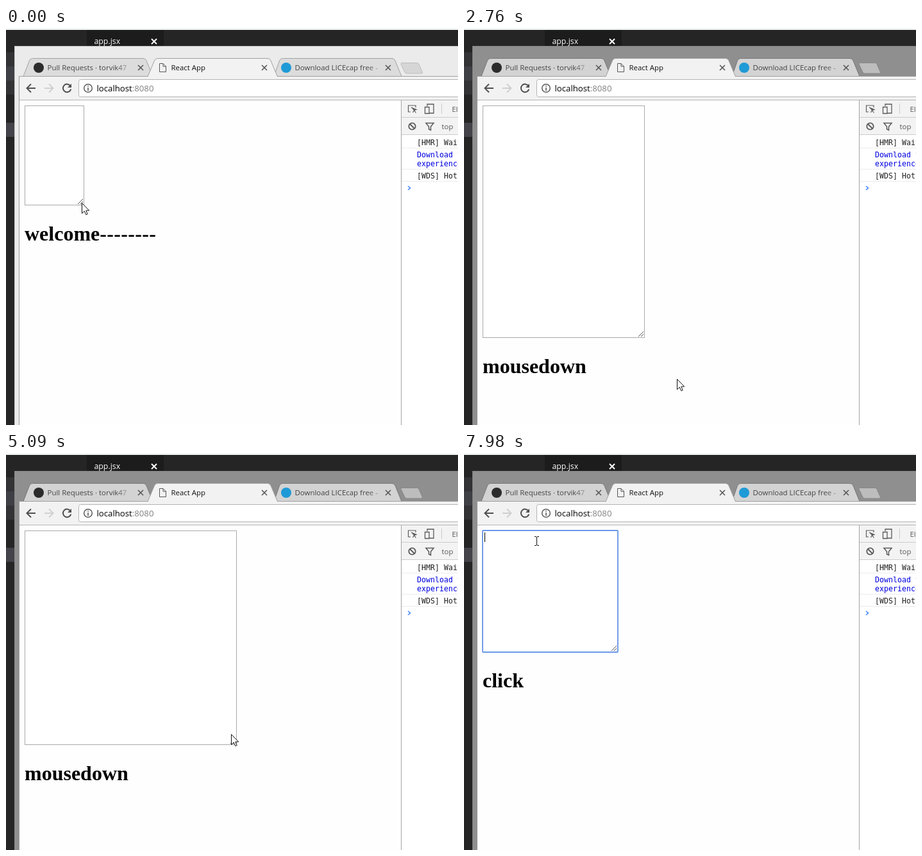
An HTML page for the animation above (8000 ms loop, 705 px wide and 620 px high).

```html
<!DOCTYPE html>
<html lang="en">
<head>
<meta charset="utf-8">
<title>React App</title>
<style>
  html, body { margin: 0; width: 100%; height: 100%; overflow: hidden; background: #252526; }
  svg { display: block; width: 705px; height: 620px; }
  text { white-space: pre; }
  .ui { font: 11.45px "Open Sans", "Noto Sans", sans-serif; }
  .mono { font: 11.63px "DejaVu Sans Mono", monospace; fill: #222; }
  .head { font: bold 32px "Liberation Serif", serif; }
  .line { fill: none; stroke-width: 1; }
  .icon { fill: none; stroke: #5a5a5a; stroke-width: 1.5; }
  .frame { fill: #ebebeb; }
  .tab { fill: #dcdcdc; stroke: #a2a2a2; }
  .plus { fill: #d6d6d6; stroke: #bcbcbc; }
  .active .frame { fill: #8f8f8f; }
  .active .tab { fill: #d3d3d3; stroke: #777; }
  .active .plus { fill: #bdbdbd; stroke: #858585; }
</style>
</head>
<body>
<svg viewBox="0 0 705 620" xmlns="http://www.w3.org/2000/svg">
  <defs>
    <linearGradient id="fade1" gradientUnits="userSpaceOnUse" x1="172" x2="198" y1="0" y2="0">
      <stop stop-color="#444"/><stop offset="1" stop-color="#444" stop-opacity="0"/>
    </linearGradient>
    <linearGradient id="fade2" gradientUnits="userSpaceOnUse" x1="562" x2="586" y1="0" y2="0">
      <stop stop-color="#444"/><stop offset="1" stop-color="#444" stop-opacity=".3"/>
    </linearGradient>
    <path id="close" d="M-4-4 4 4M4-4-4 4"/>
  </defs>

  <!-- editor behind -->
  <rect width="705" height="620" fill="#252526"/>
  <rect width="705" height="3" fill="#f1f5f4"/>
  <rect y="38" width="13" height="66" fill="#333336"/>
  <rect y="60" width="13" height="22" fill="#3f3f46"/>
  <rect y="148" width="13" height="22" fill="#434349"/>
  <rect x="126" y="3" width="120" height="25" fill="#1c1c1d"/>
  <text class="ui" x="137.5" y="25" style="font-size:12.3px" fill="#fff">app.jsx</text>
  <use href="#close" x="231" y="21" stroke="#fff" stroke-width="2"/>

  <!-- browser window -->
  <g id="win">
    <rect class="frame" x="13" y="28" width="692" height="592"/>
    <path class="line" d="M13.5 620V28.5H705" stroke="#777" stroke-opacity=".35"/>
    <path class="plus" d="M617.5 54.5H641q2 0 3 2L649.500 69q.5 2-1.500 2H625q-2 0-3-2L616 56.500q-.5-2 1.500-2Z"/>
    <path class="tab" d="M27 75.500 36.500 51q1.500-3.500 5-3.500H214q3.500 0 5 3.500L229 75.500Z"/>
    <path class="tab" d="M418 75.500 426.500 51q1.500-3.500 5-3.500H602q3.500 0 5 3.500L617 75.500Z"/>
    <path class="line" d="M20 75.500H705" stroke="#a0a0a0"/>
    <rect x="20" y="76" width="685" height="37" fill="#f2f2f2"/>
    <path d="M221 76 231.500 51q1.500-3.500 5-3.500H408q3.500 0 5 3.500L423.500 76" fill="#f2f2f2" stroke="#a0a0a0"/>
  </g>
  <circle cx="51" cy="62" r="8" fill="#2b2b2b"/>
  <circle cx="437" cy="62" r="8" fill="#1e9ad6"/>
  <path class="line" d="M239.500 55.500H245L249.500 60V68.500H239.500ZM245 55.500V60H249.500" fill="#fff" stroke="#555"/>
  <g class="ui">
    <text x="64.500" y="66" fill="url(#fade1)">Pull Requests · torvik47</text>
    <text x="257.500" y="66" fill="#111">React App</text>
    <text x="450.500" y="66" fill="url(#fade2)">Download LICEcap free -</text>
  </g>
  <g stroke="#555" stroke-width="1.6">
    <use href="#close" x="210" y="62"/><use href="#close" x="403" y="62"/><use href="#close" x="596" y="62"/>
  </g>

  <!-- toolbar -->
  <g fill="none" stroke-width="2">
    <path d="M46 94H33M39 87.500 32.500 94 39 100.500" stroke="#505050"/>
    <path d="M60 94H73M67 87.500 73.500 94 67 100.500" stroke="#d0d0d0"/>
    <path d="M100.500 90.500A6.300 6.300 0 1 0 101.300 95.500" stroke="#505050"/>
  </g>
  <path d="M102 87V93H96Z" fill="#505050"/>
  <rect x="113.500" y="80.500" width="600" height="27" rx="3" fill="#fff" stroke="#b4b4b4"/>
  <circle cx="128" cy="94" r="6.300" class="icon"/>
  <path d="M128 93V98M128 90V91.600" stroke="#5a5a5a" stroke-width="1.600"/>
  <text class="ui" x="141.500" y="99" style="font-size:13.2px">localhost<tspan fill="#808080">:8080</tspan></text>

  <!-- page -->
  <rect x="20" y="113" width="597" height="507" fill="#fefefe"/>
  <path class="line" d="M20 112.500H705" stroke="#b6b6b6"/>
  <path class="line" d="M20.500 76V620" stroke="#999"/>

  <!-- devtools -->
  <rect x="617" y="113" width="88" height="507" fill="#fff"/>
  <rect x="617" y="113" width="88" height="53" fill="#f3f3f3"/>
  <path class="line" d="M617 139.500H705M617 166.500H705M679.500 118V134" stroke="#ccc"/>
  <path class="line" d="M617 187.500H705M617 220.500H705M617 239.500H705" stroke="#ececec"/>
  <path class="line" d="M616.500 113V620" stroke="#a3a3a3"/>
  <g class="icon">
    <path d="M631 131H627.500V121H639V124" stroke-width="1.200"/>
    <path d="M632 124 640 127.500 636.500 128.500 639.500 132.500M636.500 128.500 634.500 132Z" fill="#5a5a5a" stroke-width="1.200"/>
    <path d="M657 122V119H667V133H660M653.500 123.500H660V133.500H653.500Z" stroke-width="1.300"/>
    <circle cx="633.500" cy="153.500" r="5.200" stroke-width="1.800"/>
    <path d="M630 150 637 157" stroke-width="1.800"/>
    <path d="M655 148.500H667L662.500 154V159.500L659.500 158V154Z"/>
  </g>
  <g class="ui" fill="#5a5a5a">
    <text x="695.500" y="130.500">Elements</text>
    <text x="679.500" y="158">top</text>
  </g>
  <g class="mono">
    <text x="641" y="183">[HMR] Waiting</text>
    <text x="641" y="202" fill="#0000e0" style="fill:#0000e0">Download the</text>
    <text x="641" y="216" style="fill:#0000e0">experience:</text>
    <text x="641" y="235">[WDS] Hot Module</text>
  </g>
  <path d="M627 247 630.500 250 627 253" fill="none" stroke="#4285f4" stroke-width="1.600"/>

  <!-- moving parts -->
  <rect id="area" x="29.500" y="121.500" fill="#fff" stroke="#a9a9a9"/>
  <rect id="ring" x="29" y="121" rx="1" fill="none" stroke="#6b97ea" stroke-width="1.800"/>
  <path id="grip" class="line" d="M-10-2-2-10M-6-2-2-6" stroke="#555"/>
  <rect id="caret" x="32" y="124" width="1" height="15"/>
  <text id="head" class="head" x="29"><tspan id="word"></tspan><tspan id="dash" letter-spacing=".34"></tspan></text>
  <path id="arrow" d="M.5.5V16.500L4.300 13 6.800 18.600 9.200 17.600 6.800 12H11.700Z" fill="#fff" stroke="#111"/>
  <path id="beam" class="line" d="M-3-6.500H-1L.5-5.500 2-6.500H4M.5-5.500V6.500M-3 7.500H-1L.5 6.500 2 7.500H4" stroke="#111"/>
</svg>
<script>
  const LOOP = 8000;
  const $ = id => document.getElementById(id);

  const ticks = [0, 150, 1150, 1550, 1670, 1790, 1940, 2080, 2220, 2360, 2490,
    2610, 2760, 2910, 3040, 3170, 3300, 3430, 3560, 3690,
    3990, 4130, 4270, 4400, 4540, 4680, 4810,
    5090, 5240, 5370, 5510, 5640, 5920, 6220, 6370, 6510, 6640, 7040, 7570, 7710, 7850];

  // time, box right, box bottom, pointer x, pointer y
  const poses = [
    [0, 122, 277, 118, 273],
    [150, 122, 277, 118, 272],
    [1150, 122, 277, 118, 272],
    [1790, 129, 281, 126, 278],
    [2490, 170, 386, 177, 410],
    [2760, 282, 484, 332, 548],
    [3040, 356, 564, 356, 572],
    [3300, 366, 556, 361, 548],
    [3560, 362, 500, 357, 492],
    [3690, 361, 452, 357, 436],
    [4270, 371, 307, 367, 290],
    [4810, 362, 450, 358, 443],
    [5090, 360, 456, 351, 439],
    [5640, 240, 311, 236, 306],
    [5920, 240, 311, 236, 306],
    [6220, 240, 311, 236, 300],
    [6640, 240, 311, 113, 137]
  ];

  const lastAt = (list, t) => list.filter(v => v <= t).pop();

  function poseAt(t) {
    const i = poses.findIndex(p => p[0] > t);
    if (i < 0) return poses[poses.length - 1].slice(1);
    const a = poses[i - 1], b = poses[i], k = (t - a[0]) / (b[0] - a[0]);
    return a.slice(1).map((v, n) => Math.round(v + (b[n + 1] - v) * k));
  }

  function wordAt(t) {
    if (t < 1150) return "welcome";
    return t < 5920 || (t >= 7710 && t < 7850) ? "mousedown" : "click";
  }

  function size(el, w, h) {
    el.setAttribute("width", w);
    el.setAttribute("height", h);
  }
  const place = (el, x, y) => el.setAttribute("transform", `translate(${x} ${y})`);
  const show = (el, on) => el.setAttribute("visibility", on ? "visible" : "hidden");

  function draw(time) {
    const t = lastAt(ticks, time);
    const [right, bottom, x, y] = poseAt(t);
    const focus = t >= 7040, typing = t >= 6370;
    $("win").setAttribute("class", t >= 1150 ? "active" : "");
    size($("area"), right - 30, bottom - 122);
    size($("ring"), right - 29, bottom - 121);
    place($("grip"), right, bottom);
    $("head").setAttribute("y", bottom + 55);
    $("word").textContent = wordAt(t);
    $("dash").textContent = t < 1150 ? "--------" : "";
    place($("arrow"), x, y);
    place($("beam"), x, y);
    show($("arrow"), !typing);
    show($("beam"), typing);
    show($("ring"), focus);
    show($("caret"), focus && t !== 7570);
  }

  const start = performance.now();
  function loop() {
    draw((performance.now() - start) % LOOP);
    requestAnimationFrame(loop);
  }
  loop();
</script>
</body>
</html>
```
